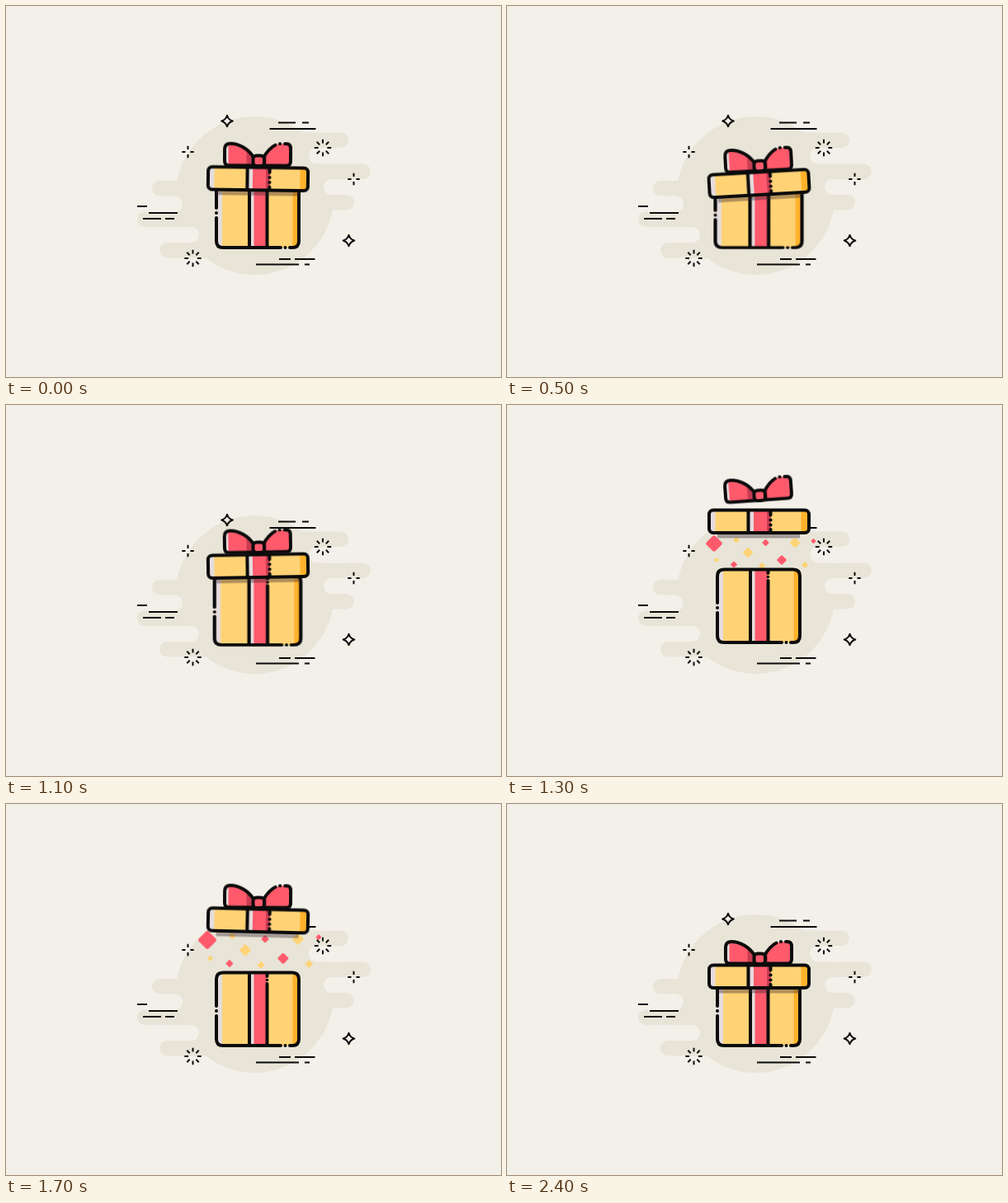
Write an HTML page that moves like this. It is 600 px wide and 450 px high and loops after 2500 ms.

```html
<!DOCTYPE html>
<html lang="en">
<head>
<meta charset="utf-8">
<title>Gift box</title>
<style>
html, body { margin: 0; width: 100%; height: 100%; overflow: hidden; background: #f3f0ea; }
svg { display: block; width: 600px; height: 450px; }

.ink { fill: none; stroke: #0b0b0b; stroke-width: 4; stroke-linecap: round; stroke-linejoin: round; }
.thin { stroke-width: 2; stroke-linecap: butt; }
.dot { fill: #0b0b0b; }
.gold { fill: #ffd375; }
.amber { fill: #ffb22b; }
.red { fill: #ff5a6c; }
.wine { fill: #c93d52; }
.shine { fill: #e5dcdd; }
.blob { fill: #e8e5d8; }
.gap { fill: #f3f0ea; }
.shade { fill: #33202c; opacity: .38; }

/* The picture advances ten times a second, so every span is cut into 100 ms steps (4% each). */
#box, #lid, #bow, #confetti { animation: 2500ms -5ms infinite; }
#box { animation-name: box; transform-origin: 305px 293px; }
#lid { animation-name: lid; transform-origin: 305.5px 209px; }
#bow { animation-name: bow; transform-origin: 306px 188px; }
#confetti { animation-name: confetti; transform-origin: 309px 194px; }

@keyframes box {
  0%   { transform: translateY(0) scale(1, 1); animation-timing-function: steps(5); }
  20%  { transform: translateY(0) scale(1.05, .94); animation-timing-function: steps(4); }
  36%  { transform: translateY(0) scale(1.09, .91); animation-timing-function: steps(1); }
  40%  { transform: translateY(0) scale(1.09, .91); animation-timing-function: steps(2); }
  48%  { transform: translateY(-4px) scale(1, 1); animation-timing-function: steps(1); }
  52%  { transform: translateY(-5px) scale(1, 1); animation-timing-function: steps(2); }
  60%, 100% { transform: translateY(0) scale(1, 1); animation-timing-function: steps(1); }
}
@keyframes lid {
  0%   { transform: translateY(.3px) rotate(.8deg); animation-timing-function: steps(2); }
  8%   { transform: translateY(2.5px) rotate(1.8deg); animation-timing-function: steps(3); }
  20%  { transform: translateY(6px) rotate(-3.3deg); animation-timing-function: steps(2); }
  28%  { transform: translateY(7.5px) rotate(1.2deg); animation-timing-function: steps(2); }
  36%  { transform: translateY(8.5px) rotate(0); animation-timing-function: steps(1); }
  40%  { transform: translateY(8.5px) rotate(0); animation-timing-function: steps(1); }
  44%  { transform: translateY(-14px) rotate(-1deg); animation-timing-function: steps(1); }
  48%  { transform: translateY(-54px) rotate(-2deg); animation-timing-function: steps(1); }
  52%  { transform: translateY(-68px) rotate(0); animation-timing-function: steps(4); }
  68%  { transform: translateY(-68px) rotate(1.4deg); animation-timing-function: steps(1); }
  72%  { transform: translateY(-68px) rotate(.5deg); animation-timing-function: steps(2); }
  80%  { transform: translateY(2px) rotate(0); animation-timing-function: steps(4); }
  96%, 100% { transform: translateY(0) rotate(0); animation-timing-function: steps(1); }
}
@keyframes bow {
  0%   { transform: translateY(0) rotate(.3deg); animation-timing-function: steps(2); }
  8%   { transform: translateY(2.5px) rotate(1.2deg); animation-timing-function: steps(3); }
  20%  { transform: translateY(6.3px) rotate(-3deg); animation-timing-function: steps(2); }
  28%  { transform: translateY(8px) rotate(1deg); animation-timing-function: steps(2); }
  36%  { transform: translateY(9.2px) rotate(0); animation-timing-function: steps(1); }
  40%  { transform: translateY(9.2px) rotate(0); animation-timing-function: steps(1); }
  44%  { transform: translateY(-15px) rotate(-1deg); animation-timing-function: steps(1); }
  48%  { transform: translateY(-60px) rotate(-3deg); animation-timing-function: steps(1); }
  52%  { transform: translateY(-78px) rotate(-4deg); animation-timing-function: steps(3); }
  64%  { transform: translateY(-69px) rotate(0); animation-timing-function: steps(1); }
  68%  { transform: translateY(-68px) rotate(.5deg); animation-timing-function: steps(1); }
  72%  { transform: translateY(-69px) rotate(0); animation-timing-function: steps(2); }
  80%  { transform: translateY(2px) rotate(0); animation-timing-function: steps(4); }
  96%, 100% { transform: translateY(0) rotate(0); animation-timing-function: steps(1); }
}
@keyframes confetti {
  0%   { transform: scale(.4); opacity: 0; animation-timing-function: steps(1); }
  48%  { transform: scale(.75); opacity: 1; animation-timing-function: steps(1); }
  52%  { transform: scale(1); opacity: 1; animation-timing-function: steps(4); }
  68%  { transform: scale(1.12); opacity: 1; animation-timing-function: steps(1); }
  72%  { transform: scale(.8); opacity: .5; animation-timing-function: steps(1); }
  76%, 100% { transform: scale(.4); opacity: 0; animation-timing-function: steps(1); }
}
</style>
</head>
<body>
<svg viewBox="0 0 600 450">
  <defs>
    <path id="star" class="ink thin" d="M0-6.8Q1.6-1.6 6.8 0Q1.6 1.6 0 6.8Q-1.6 1.6-6.8 0Q-1.6-1.6 0-6.8Z"/>
    <path id="cross" class="ink thin" d="M0-7.2V-3M0 3V7.2M-7.2 0H-3M3 0H7.2"/>
    <g id="burst">
      <path id="rays" class="ink thin" d="M0-10.2V-5.4M0 5.4V10.2M-10.2 0H-5.4M5.4 0H10.2"/>
      <use href="#rays" transform="rotate(45)"/>
    </g>
    <rect id="chip" x="-.72" y="-.72" width="1.44" height="1.44" rx=".22" transform="rotate(45)"/>
    <clipPath id="boxClip"><rect x="255" y="204.5" width="100" height="88.5" rx="8"/></clipPath>
    <clipPath id="lidClip"><rect x="245" y="195.5" width="121" height="27.5" rx="5"/></clipPath>
    <path id="lobeL" d="M301 185C294 173 282 167 272 167Q265 167 265 174V188Q265 193.5 270 193.5H301Z"/>
    <path id="lobeR" d="M311 185C317 175 325 167 334 167H340Q345 167 345 173V188Q345 193.5 340 193.5H311Z"/>
    <clipPath id="bowClip"><use href="#lobeL"/><use href="#lobeR"/></clipPath>
  </defs>

  <g class="blob">
    <circle cx="301.5" cy="230" r="96"/>
    <rect x="340" y="153.5" width="75" height="18.5" rx="9.2"/>
    <rect x="350" y="191.5" width="92" height="18.5" rx="9.2"/>
    <rect x="350" y="229" width="72" height="18.5" rx="9.2"/>
    <rect x="177" y="212" width="80" height="18.5" rx="9.2"/>
    <rect x="159" y="249.5" width="90" height="18.5" rx="9.2"/>
    <rect x="186" y="287" width="80" height="18.5" rx="9.2"/>
  </g>
  <g class="gap">
    <rect x="367" y="172" width="50" height="19.5" rx="9.7"/>
    <rect x="385" y="210" width="50" height="19" rx="9.5"/>
    <rect x="164" y="230.5" width="50" height="19" rx="9.5"/>
    <rect x="184" y="268" width="50" height="19" rx="9.5"/>
  </g>

  <path class="ink thin" d="M330 141.5H351M359 141.5H367M319.500 149H375.500
    M159 243H171M173 251H208M166 258H188M193 258H204
    M331 307H345M350 307H374.500M303 313.500H355M362 313.500H368"/>
  <use href="#star" x="268" y="139.500"/>
  <use href="#star" x="415.500" y="284.500"/>
  <use href="#cross" x="220.500" y="177"/>
  <use href="#cross" x="421.500" y="210"/>
  <use href="#burst" x="384" y="172"/>
  <use href="#burst" x="226.500" y="306"/>

  <g id="confetti">
    <g class="red">
      <use href="#chip" transform="translate(251 168) scale(10.500)"/>
      <use href="#chip" transform="translate(313.500 167) scale(4.300)"/>
      <use href="#chip" transform="translate(371.500 165) scale(3.200)"/>
      <use href="#chip" transform="translate(333 188) scale(6.200)"/>
      <use href="#chip" transform="translate(275 193.500) scale(4.200)"/>
    </g>
    <g class="gold">
      <use href="#chip" transform="translate(278 163.500) scale(4)"/>
      <use href="#chip" transform="translate(292 179) scale(6.500)"/>
      <use href="#chip" transform="translate(349 167) scale(6.500)"/>
      <use href="#chip" transform="translate(254 188) scale(3.200)"/>
      <use href="#chip" transform="translate(309 195) scale(4.200)"/>
      <use href="#chip" transform="translate(361 194) scale(4.200)"/>
    </g>
  </g>

  <g id="box">
    <g clip-path="url(#boxClip)">
      <rect class="gold" x="255" y="204" width="100" height="90"/>
      <rect class="shine" x="255" y="204" width="7" height="90"/>
      <rect class="amber" x="347.500" y="204" width="8" height="90"/>
      <rect class="red" x="295" y="204" width="21" height="90"/>
      <rect class="shine" x="295" y="204" width="5.500" height="90"/>
    </g>
    <path class="ink" d="M255 245V212.500Q255 204.500 263 204.500H347Q355 204.500 355 212.500V285Q355 293 347 293H344
      M333 293H263Q255 293 255 285V257M295 205V293M316.500 205V209M316.500 218V293"/>
    <circle class="dot" cx="255" cy="251" r="2"/>
    <circle class="dot" cx="338.500" cy="293" r="2"/>
    <circle class="dot" cx="316.500" cy="213.500" r="1.800"/>
  </g>

  <g id="lid">
    <rect class="shade" x="255" y="224" width="100" height="5.500"/>
    <g clip-path="url(#lidClip)">
      <rect class="gold" x="245" y="195" width="121" height="29"/>
      <rect class="shine" x="245" y="195" width="7.500" height="29"/>
      <rect class="amber" x="356.500" y="195" width="10" height="29"/>
      <rect class="red" x="292" y="195" width="28" height="29"/>
      <rect class="shine" x="292" y="195" width="7" height="29"/>
      <rect class="wine" x="315" y="195" width="4" height="29"/>
    </g>
    <rect class="ink" x="245" y="195.500" width="121" height="27.500" rx="5"/>
    <path class="ink" d="M292.500 196V223M319.500 196V201.500M319.500 219V223"/>
    <circle class="dot" cx="319.500" cy="207.500" r="2.100"/>
    <circle class="dot" cx="319.500" cy="213.500" r="2.100"/>
  </g>

  <g id="bow">
    <g clip-path="url(#bowClip)">
      <rect class="red" x="260" y="160" width="90" height="40"/>
      <rect class="shine" x="264" y="160" width="5.500" height="40"/>
      <rect class="wine" x="291.500" y="160" width="29" height="40"/>
      <rect class="red" x="316" y="160" width="5" height="40"/>
    </g>
    <use href="#lobeL" class="ink"/>
    <path class="ink" d="M311 185C316 177 321 171 326.500 168.500M338 167H340Q345 167 345 173V188Q345 193.500 340 193.500H311"/>
    <circle class="dot" cx="332" cy="167" r="2.100"/>
    <rect class="red" x="299.500" y="181.500" width="13.500" height="12.500" rx="4"/>
    <rect class="ink" x="299.500" y="181.500" width="13.500" height="12.500" rx="4"/>
  </g>
</svg>
</body>
</html>
```
